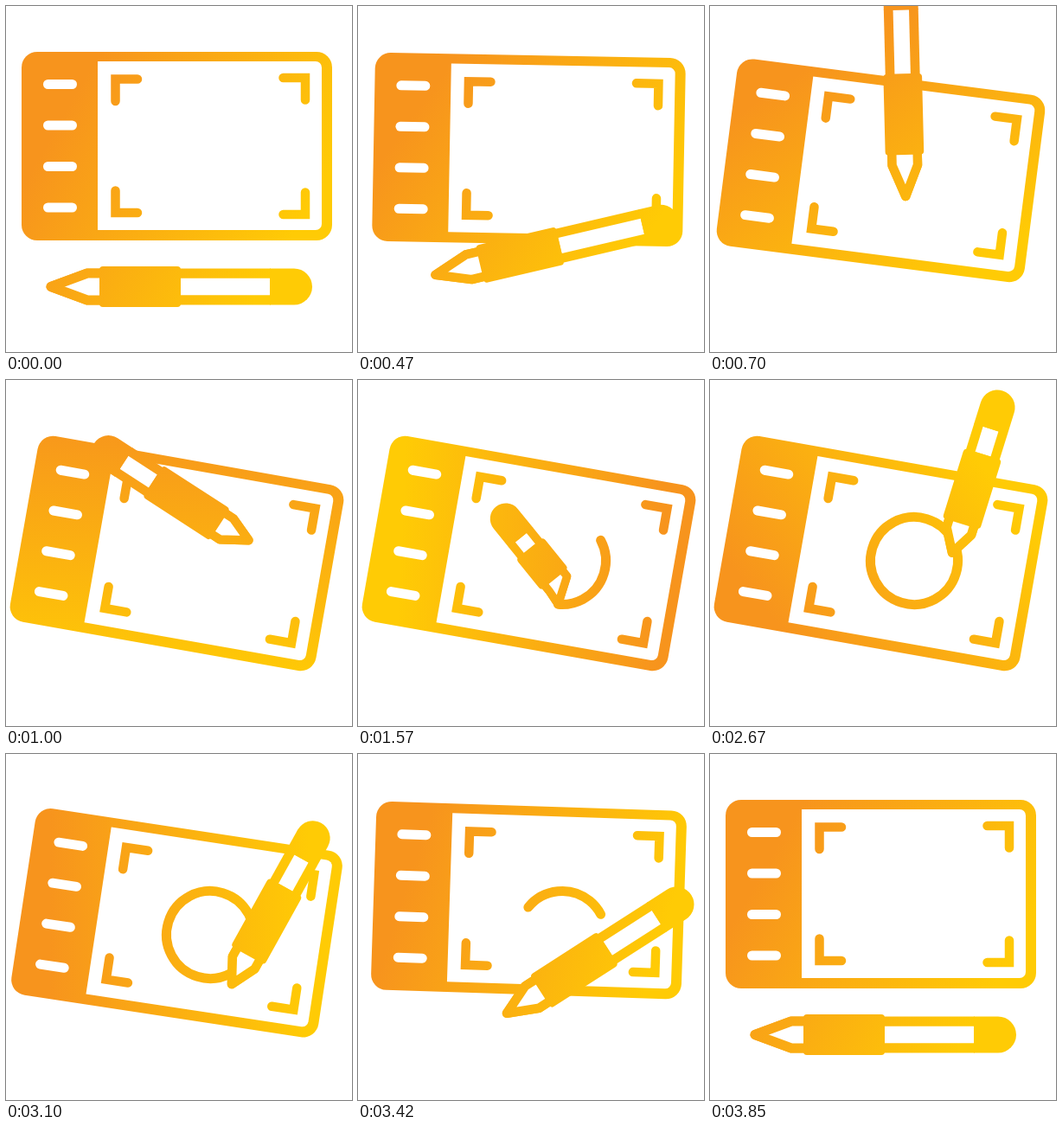
Recreate the animation shown at these times as an HTML page with a canvas. Size 400 by 400 pixels, loop 3.87 s.

```html
<!DOCTYPE html>
<html lang="en">
<head>
<meta charset="utf-8">
<title>Drawing tablet</title>
<style>
  html, body { margin: 0; width: 100%; height: 100%; overflow: hidden; background: #fff; }
  canvas { display: block; width: 100vmin; height: 100vmin; }
</style>
</head>
<body>
<canvas id="stage" width="400" height="400"></canvas>
<script>
const ctx = document.getElementById('stage').getContext('2d');
const LOOP = 3870, RAD = Math.PI / 180;
const RING = { x: 236, y: 209, r: 50.5, start: -28 };

// time, tip x, tip y, angle, nib, sleeve, barrel, cap, thickness, nib skew
const PEN = [
  [370, 52, 324.5, 180, 56, 94, 103, 49, 1, 0],
  [470, 89, 311, 167, 53, 95, 98, 42, .95, 0],
  [780, 255, 200, 66, 46, 93, 65, 42, .95, 0],
  [1000, 281, 185, 33, 38, 92, 40, 41, .93, -3],
  [1570, 231, 259, 51, 25, 46, 16, 46, .86, 15],
  [2250, 233, 158, 90, 24, 65, 13, 41, 1, 1],
  [2560, 281, 185, 104, 34, 82, 28, 46, .97, 0],
  [3100, 261, 266, 119, 38, 90, 38, 47, .95, 0],
  [3850, 52, 324.5, 180, 56, 94, 103, 49, 1, 0]
];
const SWEEP = [[1000, 0], [1570, 123], [2250, 293], [2560, 360]];
const ERASE = [[3120, 0], [3600, 360]];
const HUE_TURN = [[370, 30], [470, 36], [1000, 92], [1570, 182], [2250, 272], [3100, 360], [3850, 390]];
const TILT = [[370, 0], [870, 1], [2950, 1], [3600, 0]];

// Monotone cubic interpolation of one column of a key table
function sample(keys, t, col = 1) {
  const last = keys.length - 1;
  if (t <= keys[0][0]) return keys[0][col];
  if (t >= keys[last][0]) return keys[last][col];
  const i = keys.findIndex(k => k[0] > t) - 1;
  const rate = j => (keys[j + 1][col] - keys[j][col]) / (keys[j + 1][0] - keys[j][0]);
  const slope = j => {
    if (j === 0 || j === last) return 0;
    const a = rate(j - 1), b = rate(j);
    return a * b <= 0 ? 0 : 2 * a * b / (a + b);
  };
  const span = keys[i + 1][0] - keys[i][0];
  const u = (t - keys[i][0]) / span, v = 1 - u;
  return keys[i][col] * v * v * (1 + 2 * u) + keys[i + 1][col] * u * u * (3 - 2 * u)
    + span * u * v * (slope(i) * v - slope(i + 1) * u);
}

function box(x, y, w, h, r, color) {
  ctx.fillStyle = color;
  ctx.beginPath();
  ctx.roundRect(x, y, w, h, r);
  ctx.fill();
}

function line(points, width, color, join = 'miter') {
  ctx.beginPath();
  points.forEach(p => ctx.lineTo(...p));
  ctx.lineWidth = width;
  ctx.strokeStyle = color;
  ctx.lineCap = 'round';
  ctx.lineJoin = join;
  ctx.stroke();
}

// Linear gradient fixed to the stage, expressed in a rotated local frame
function paintFor(t, ox, oy, turn) {
  const a = sample(HUE_TURN, t) * RAD - turn;
  const dx = 200 - ox, dy = 195 - oy, c = Math.cos(turn), s = Math.sin(turn);
  const x = dx * c + dy * s, y = dy * c - dx * s;
  const gx = 150 * Math.cos(a), gy = 150 * Math.sin(a);
  const paint = ctx.createLinearGradient(x - gx, y - gy, x + gx, y + gy);
  paint.addColorStop(0, '#f7941d');
  paint.addColorStop(1, '#ffcb05');
  return paint;
}

function placed(t, x, y, turn, draw) {
  ctx.save();
  ctx.translate(x, y);
  ctx.rotate(turn);
  draw(paintFor(t, x, y, turn));
  ctx.restore();
}

function drawTablet(t) {
  const k = sample(TILT, t);
  placed(t, 197.5, 162 + 38.5 * k, 10 * RAD * k, paint => {
    ctx.translate(-197.5, -162);
    ctx.translate(197.5, 162);
    box(-179.5, -109, 359, 218, 18, paint);
    box(-91.5, -98, 259, 195, [0, 7, 7, 0], '#fff');
    for (let i = 0; i < 4; i++) {
      const y = -71.5 + 47.5 * i;
      line([[-149, y], [-121, y]], 11, '#fff');
    }
    const bracket = (x, y, sx, sy) =>
      line([[x + 25.5 * sx, y], [x, y], [x, y + 25.5 * sy]], 10.5, paint);
    bracket(-71, -77.5, 1, 1);
    bracket(148.5, -79, -1, 1);
    bracket(-71, 77, 1, -1);
    bracket(148.5, 79, -1, -1);
  });
}

function drawRing(t) {
  const from = sample(ERASE, t), to = sample(SWEEP, t);
  if (to <= from) return;
  ctx.beginPath();
  ctx.arc(RING.x, RING.y, RING.r, (RING.start + from) * RAD, (RING.start + to) * RAD);
  ctx.lineWidth = 11;
  ctx.lineCap = 'round';
  ctx.strokeStyle = paintFor(t, 0, 0, 0);
  ctx.stroke();
}

function drawPen(t) {
  let [x, y, angle, nib, sleeve, barrel, cap, w, skew] =
    PEN[0].slice(1).map((_, i) => sample(PEN, t, i + 1));
  const sweep = sample(SWEEP, t);
  if (sweep > 0 && sweep < 360) {
    const a = (RING.start + sweep) * RAD;
    x = RING.x + RING.r * Math.cos(a);
    y = RING.y + RING.r * Math.sin(a);
  }
  const turn = angle * RAD, c = Math.cos(turn), s = Math.sin(turn);
  placed(t, x - nib * c + skew * s, y - nib * s - skew * c, turn, paint => {
    const half = 21 * w, side = 15.5 * w, shoulder = nib * .25;
    ctx.fillStyle = '#fff';
    line([[-4, -side], [shoulder, -side], [nib, skew], [shoulder, side], [-4, side]], 11 * w, paint, 'round');
    ctx.fill();
    ctx.stroke();
    const back = -sleeve - barrel;
    box(back - 1, -half, barrel + 2, 2 * half, 0, paint);
    box(back, -9.7 * w, barrel, 19.4 * w, 0, '#fff');
    box(back - cap, -half, cap, 2 * half, [half, 0, 0, half], paint);
    box(-sleeve, -23.5 * w, sleeve, 47 * w, 4, paint);
  });
}

function frame() {
  const t = performance.now() % LOOP;
  ctx.fillStyle = '#fff';
  ctx.fillRect(0, 0, 400, 400);
  drawTablet(t);
  drawRing(t);
  drawPen(t);
  requestAnimationFrame(frame);
}
frame();
</script>
</body>
</html>
```
